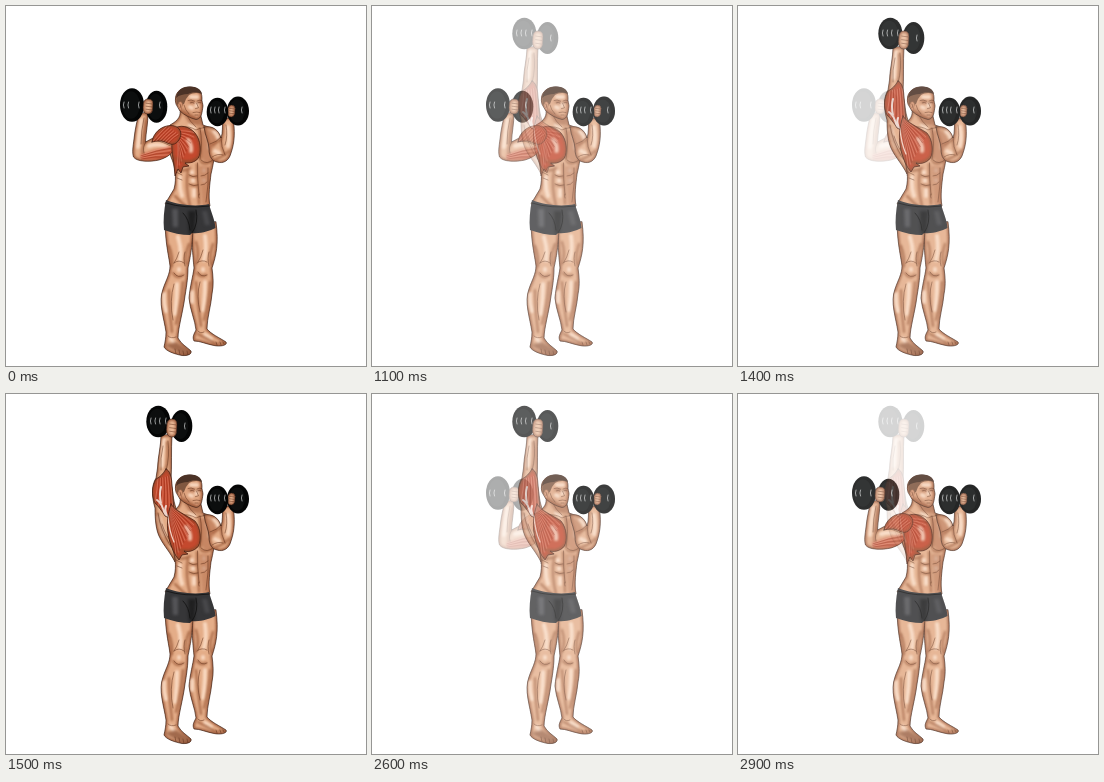
Recreate the animation shown at these times as an HTML page. Size 360 by 360 pixels, loop 3000 ms.

```html
<!DOCTYPE html>
<html lang="en">
<head>
<meta charset="utf-8">
<title>Single-arm dumbbell press</title>
<style>
html, body { margin: 0; width: 100%; height: 100%; overflow: hidden; background: #fff; }
svg { display: block; width: 100vw; height: 100vh; }
path { stroke-linecap: round; stroke-linejoin: round; }
.edge { fill: none; stroke: #2b140b; stroke-width: .6; }
.rim { fill: none; stroke: #8f4a2c; stroke-width: 3.4; opacity: .75; filter: blur(1px); }
.dark { fill: none; stroke: #93502f; stroke-width: 2.2; opacity: .7; filter: blur(.8px); }
.light { fill: none; stroke: #ffe6d2; stroke-width: 4; opacity: .75; filter: blur(1.3px); }
.line { fill: none; stroke: #5a2a16; stroke-width: .6; opacity: .8; }
</style>
</head>
<body>
<svg id="stage" viewBox="0 0 360 360"></svg>
<script>
const SKIN = '#e4ad88', TAN = '#d0946f', RED = '#c4492e', CLOTH = '#363638', HAIR = '#4b3226';
let clips = 0;

const path = (kind, d) => d ? `<path class="${kind}" d="${d}"/>` : '';

// A filled shape with a soft rim, and shading kept inside its outline.
function part(fill, d, { dark, light, line, extra = '', edge = true } = {}) {
  const id = 'clip' + clips++;
  return `<clipPath id="${id}"><path d="${d}"/></clipPath>
    <path d="${d}" fill="${fill}"/>
    <g clip-path="url(#${id})">${edge ? path('rim', d) : ''}${path('light', light)}
    ${path('dark', dark)}${extra}${path('line', line)}</g>${edge ? path('edge', d) : ''}`;
}

// Soft patch of colour, for broad shading inside a part.
const patch = (fill, d, opacity = .6) =>
  `<path d="${d}" fill="${fill}" opacity="${opacity}" style="filter:blur(1.4px)"/>`;

// Muscle fibres running from segment a-b to segment c-d.
function fibres([ax, ay, bx, by], [cx, cy, dx, dy], n) {
  let out = '';
  for (let i = 0; i < n; i++) {
    const u = i / (n - 1), mix = (p, q) => p + (q - p) * u;
    const x1 = mix(ax, bx), y1 = mix(ay, by), x2 = mix(cx, dx), y2 = mix(cy, dy);
    out += `<path d="M${x1} ${y1}Q${(x1 + x2) / 2 + 1} ${(y1 + y2) / 2 - 2} ${x2} ${y2}" fill="none"
      stroke="${i % 2 ? '#8a2413' : '#ef9d84'}" stroke-width=".6" opacity=".7"/>`;
  }
  return out;
}

const plate = (x, y, rx, ry) =>
  `<ellipse cx="${x}" cy="${y}" rx="${rx}" ry="${ry}" fill="#040505"/>
   <ellipse cx="${x - 1}" cy="${y}" rx="${rx - 3}" ry="${ry - 3}" fill="#0c0e0e"/>`;

const marks = (y, ...xs) => xs.map(x =>
  `<path d="M${x} ${y - 3}q-1.3 3 0 6" fill="none" stroke="#a5a8a8" stroke-width=".9"/>`).join('');

// A closed hand: palm outline plus finger creases.
function fist(x, y, w, h) {
  const d = `M${x + 1} ${y + h * .25}q1 ${-h * .25} ${w * .45} ${-h * .25}q${w * .5} 0 ${w * .5} ${h * .3}`
    + `l${-w * .05} ${h * .45}q-1 ${h * .25} ${-w * .45} ${h * .25}q${-w * .5} 0 ${-w * .5} ${-h * .4}z`;
  const line = [.28, .48, .68].map(k => `M${x + w * .35} ${y + h * k}l${w * .6} ${h * .05}`).join('');
  return part('#e9b896', d, { line });
}

const legs =
  part(SKIN, 'M185 216C186 240 187 252 188 262C187 270 184 280 183 292C184 304 189 314 190 324C188 328 186 331 188 335C194 335 200 338 208 339.5C215 341 222 339 220 336C214 332 205 328 201 323C201 312 205 300 206 288C208 278 207 270 206 262C210 250 213 238 210 216Z', {
    dark: 'M190 236Q194 248 190 258M207 238Q203 250 205 258M191 267Q195 272 200 269M190 276Q192 300 195 320M204 276Q203 296 198 314M192 328Q200 332 210 338M218 337l-6 0',
    light: 'M199 230Q201 244 198 254M197 263v1M199 276Q199 292 197 304M186 286v10M199 329l6 4',
    line: 'M191 257Q196 253 201 256M192 266Q195 272 201 269M197 244Q195 252 192 256M194 276Q190 290 194 306M203 246Q201 252 203 260M210 336l1 3M214 336l1 3M217 336l1 2M192 325q2 3 6 1'
  }) +
  part(SKIN, 'M159 212C159 238 163 250 164 260C164 268 160 274 157 283C152 296 158 312 160 326C160 332 159 336 158 341C160 345 168 348 176 349.5C182 350 186 348 185 345C181 341 175 338 172 332C172 322 177 306 179 290C181 278 182 270 182 262C184 252 187 240 187 216Z', {
    dark: 'M163 240Q167 250 166 260M183 238Q178 250 180 258M167 267Q171 274 177 269M163 284Q163 305 166 326M177 276Q175 300 170 318',
    light: 'M172 231Q176 244 174 254M173 263v1M171 278Q171 292 169 308M158 288Q157 296 160 305M165 333l2 3',
    line: 'M168 257Q173 253 178 257M168 267Q172 273 178 269M173 246Q171 253 168 257M168 278Q163 295 167 314M179 246Q177 252 179 260M162 330q3 3 8 1',
    extra: patch('#7d452c', 'M158 339L170 336L187 346L180 351Z', .65)
      + path('line', 'M169 343l1 5M173 344l1 5M177 345l1 5M181 345l1 4')
  });

const torso =
  part(SKIN, 'M174 103C175 110 173 114 164 119C161 128 162 142 165 151C169 160 171 172 168 183L159 198C172 206 190 206 204 200C202 190 204 177 205 168C207 160 209 148 211 136C211 127 207 122 197 119L194 106Z', {
    extra: patch('#a9613f', 'M194 124L208 124L212 138L207 155L199 157L194 151Z', .5)
      + patch('#9c5838', 'M174 103L195 108L195 120L184 118Z', .65)
      + patch('#a9613f', 'M193 160L205 160L204 200L196 200Z', .45),
    dark: 'M193 122Q196 136 194 154M195 156Q201 160 208 153M191 158Q192 175 193 198M182 164Q179 180 184 200M184 170l7 1M184 179l8 1M169 190Q175 197 184 203M172 164Q178 166 184 162',
    light: 'M201 130Q204 134 203 142M186 166v1M187 174v1M188 184v6M198 164v1M198 174v1M174 171Q173 182 176 190M184 119l4 3',
    line: 'M191.500 157Q191 172 193 189M183 169q4 3 8 1M183 178q5 3 9 1M195 170q4 0 7-3M195 179q4 0 6-3M193 188q-1 2 0 4M195 154Q201 160 208 153M194 122Q197 137 194 153M180 108Q184 116 190 121M176 121Q184 120 190 124Q197 120 207 123M170 166l6 3M171 172l5 2M202 162Q203 178 200 196'
  }) +
  part(CLOTH, 'M160 194C172 199 190 201 203 198C205 206 209 214 209.500 222C203 225 195 228 186 227L184 229C176 229 166 227 158 224C157 214 158 204 160 194Z', {
    edge: false,
    extra: patch('#6a6a6e', 'M166 203L172 203L172 221L167 221Z', .6)
      + patch('#5c5c60', 'M196 205L201 205L204 219L199 219Z', .5)
      + patch('#111', 'M182 205L190 205L188 228L183 228Z', .6)
      + `<path d="M160 197Q178 203 204 200M190 204Q193 217 186 227M177 207Q183 213 184 224" fill="none" stroke="#111" stroke-width=".8"/>`
  });

const restingArm =
  part(SKIN, 'M198 121C206 119 213 124 215 132C217 127 216 120 217 112L227 112C229 124 229 136 225 147C223 155 217 158 211 156C206 155 203 151 203 143C203 136 199 130 198 121Z', {
    extra: patch('#a9613f', 'M198 121L206 126L212 136L204 146Z', .5),
    dark: 'M206 139Q211 136 215 133Q215 143 219 149M210 153Q217 151 223 145',
    light: 'M208 126q4 2 4 6M222 121Q224 132 222 140M209 145l4 2',
    line: 'M204 138Q211 136 215 131Q215 141 219 149M220 119Q222 130 219 139M206 151Q212 147 217 149'
  }) +
  plate(232, 105, 11, 14.6) + fist(221, 99, 7.500, 12) + plate(211.5, 106, 10.8, 14.2) +
  marks(104, 205, 209, 213, 219, 236);

const head =
  part('#dfa47f', 'M170 98C167 88 174 81 183 81C191 81 196 85 196 92C195.500 95 197 98 197 100C196 106 196 113 190 113.500C184 112 178 109 174 105Z', {
    extra: patch('#9c5838', 'M174 101L179 104L190 111L190 115L180 112Z', .65)
      + patch('#8a4b2f', 'M183 94.500L189 95L189 97L183 97Z', .8)
      + patch('#8a4b2f', 'M191 95L196 94.500L195 97L192 97Z', .8),
    light: 'M185 91l6 0M184 101l2 1M190.500 98v2',
    line: 'M182 94.500q3-1.500 6.500 .6M191 95q3-1.500 5-.5M184.500 96.700q2-1 3.500 .3M191.800 96.700q2-.6 3 0M190.500 97l2 4.800-3 .8M187 106.500q4-1 7 0M189 109h3M178 99q1 5 5 9'
  }) +
  part('#805740', 'M171 98C168 88 174 81 183 81C190 81 195 84 195.500 88C191 86 186 87 183 89L180 93L178 98L175 99L173 102Z', { edge: false }) +
  part(HAIR, 'M170 92C171 84 177 80.500 184 80.500C191 80.500 195.500 84 196 88C191 85.500 186 86 182 88C178 88 173 89 170 92Z', { edge: false }) +
  part('#d39370', 'M172 98q0-3 3-2.500q2 1 1.500 4l-1 4q-2 1-3-2z', { edge: false, line: 'M172 98q0-3 3-2.500q2 1 1.500 4l-1 4M174 98q2 2 0 4' });

const loweredArm =
  part(SKIN, 'M133 107C131 115 129 123 128 133C127 141 126 146 127.500 151C131 156 144 156 153 154C159 152 164 150 170 142L168 124L149 131L139.500 136C140 126 142 118 142 107Z', {
    dark: 'M139 137Q135 143 137 148M140 114Q138 126 137 138',
    light: 'M135 114Q133 127 132 141M143 140Q153 137 160 141',
    line: 'M140 136Q136 141 138 147M138 112Q135 125 135 138M149 134Q157 136 165 140',
    extra: patch(RED, 'M134 149Q150 143 168 140L168 149L154 154L136 154Z', .8)
      + fibres([135, 149, 135, 153], [166, 140, 162, 151], 6)
  });

const redLow =
  part(RED, 'M167 123C174 118 183 120 189 127C195 134 195.500 146 192.500 152C188 157 184 157 179 157L183 160L177 161L175 167L172 163L169 170L168 159C167 151 164 140 167 123Z', {
    extra: fibres([169, 125, 172, 137], [190, 127, 171, 163], 19),
    light: 'M182 134Q186 139 185 145', dark: 'M170 152Q180 159 192 152'
  }) +
  part(RED, 'M146 136C147 127 155 120 164 119.500C172 119 177 125 174 132C171 138 167 140 161 137C156 134 151 135 146 136Z', {
    extra: fibres([161, 120, 173, 129], [147, 135, 163, 137], 12)
  });

const raisedArm =
  part(SKIN, 'M155 41C155 52 152 62 151.500 74L150 84C145 92 146 104 149 114C149 126 150 137 154 144C158 152 164 158 169 168L178 130L170 114C167 106 167 98 165 86C166 72 165 56 166 41Z', {
    dark: 'M161 48Q163 63 160 75M152 120Q154 135 163 150',
    light: 'M158 46Q156 60 156 72M153 123Q155 133 159 141',
    line: 'M162 47Q164 62 160 77M157 52Q154 65 155 76M152 119Q154 135 165 153M156 130Q160 143 167 150'
  }) +
  part(RED, 'M160 75C164 76 166 84 166 92C167 99 167 108 168 114L167 126L159 122C156 117 152 112 149 109C145 101 146 92 150 85C154 83 157 80 160 75Z', {
    extra: fibres([152, 85, 164, 82], [149, 108, 167, 124], 11)
      + `<path d="M151 106Q156 109 159 121M155 93Q153 100 155 109M160 112Q158 116 162 124" fill="none" stroke="#f3e3dc" stroke-width="2" opacity=".9"/>`
  });

const redHigh =
  part(RED, 'M165 110C168 116 180 121 189 127C195 134 195.500 146 192.500 152C188 158 181 158 178 157L182 160L176 161L173 166L170 162C162 148 158 130 165 110Z', {
    extra: fibres([165, 113, 163, 120], [190, 127, 169, 164], 20)
      + `<path d="M162 122Q163 137 168 148" fill="none" stroke="#f3d2c4" stroke-width="1.300"/>`,
    light: 'M180 133Q185 139 184 145', dark: 'M171 155Q182 160 192 152'
  });

const lowBell = plate(126, 99, 12, 16.8) + plate(150.500, 100.8, 10.8, 16)
  + marks(99, 118, 122.5, 133, 154) + fist(136.500, 93, 10, 15);
const highBell = plate(152.3, 27.500, 12, 15.8) + plate(175.5, 32, 10.8, 16)
  + marks(27, 145, 149.5, 154, 160) + marks(32, 179) + fist(160, 25, 10.500, 18);

const use = id => `<use href="#${id}"/>`;
const stage = document.getElementById('stage');
stage.innerHTML = `<defs>
  <g id="trunk">${legs}${torso}</g>
  <g id="front">${restingArm}${head}</g></defs>
  <g id="lowered">${use('trunk')}${loweredArm}${redLow}${lowBell}${use('front')}</g>
  <g id="raised">${raisedArm}${use('trunk')}${redHigh}${highBell}${use('front')}</g>`;

const lowered = document.getElementById('lowered');
const raised = document.getElementById('raised');

// Dissolve in sixths, one step every 100 ms.
const fade = (t, start) => t < start ? 0 : Math.min(1, (Math.floor((t - start) / 100) + 1) / 6);

function draw(now) {
  const t = now % 3000;
  const up = fade(t, 1000) - fade(t, 2500);
  lowered.setAttribute('opacity', 1 - up);
  raised.setAttribute('opacity', up);
  requestAnimationFrame(draw);
}
draw(performance.now());
</script>
</body>
</html>
```
